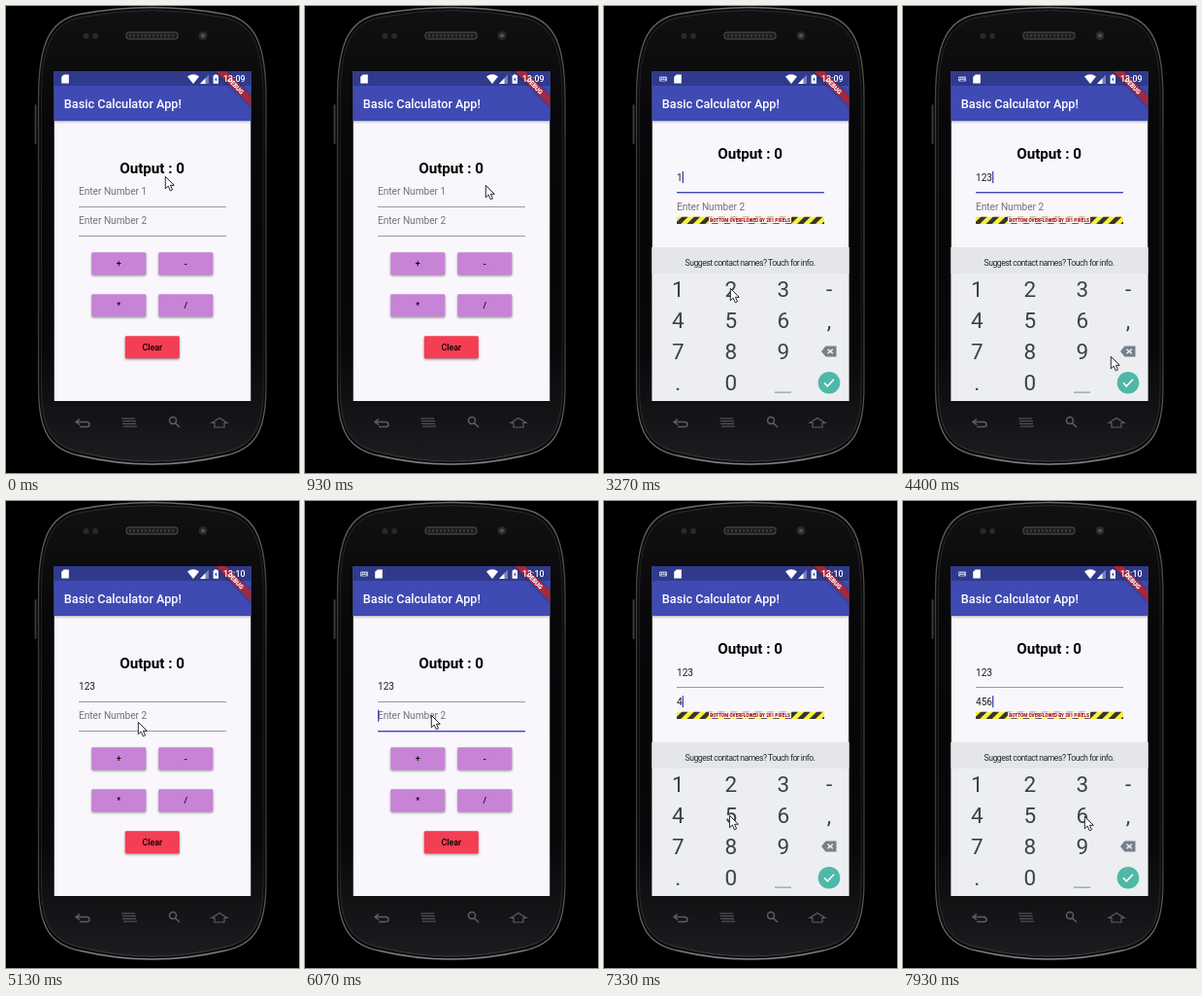
An HTML page with a canvas that plays this animation: 302 px wide and 480 px high, repeating every 8000 ms.

```html
<!DOCTYPE html>
<html lang="en">
<head>
<meta charset="utf-8">
<title>Basic Calculator App</title>
<style>
  html, body { margin: 0; width: 100%; height: 100%; overflow: hidden; background: #000; }
  canvas { display: block; }
</style>
</head>
<body>
<canvas id="stage" width="302" height="480"></canvas>
<script>
const ctx = document.getElementById('stage').getContext('2d');
const LOOP = 8000;
const SCREEN = [49.5, 67, 203, 339];
const INDIGO = '#3f4ab3', DARK_INDIGO = '#303a8c';

// Time, x, y of the mouse pointer's tip.
const POINTER = [
  [0, 164, 175], [220, 102, 257], [370, 190, 262], [520, 106, 305], [660, 152, 346],
  [930, 186, 184], [1250, 162, 191], [2250, 162, 191], [2650, 76, 288], [2850, 76, 288],
  [3200, 130, 290], [3400, 130, 290], [3800, 183, 290], [4020, 183, 290],
  [4400, 214, 360], [4560, 230, 384], [4720, 230, 384], [5130, 136, 227],
  [5200, 132, 222], [6080, 130, 220], [6600, 82, 309], [7100, 77, 321],
  [7350, 130, 323], [7520, 130, 323], [7780, 187, 324], [8000, 187, 324]
];

const FIELDS = [
  { hint: 'Enter Number 1', y: 190.5, focus: 1450, blur: 4650, keys: [[2800, '1'], [3300, '2'], [3950, '3']] },
  { hint: 'Enter Number 2', y: 220.7, focus: 5900, blur: LOOP, keys: [[7050, '4'], [7450, '5'], [7870, '6']] }
];
const KEYBOARD = [{ icon: 1540, open: 1600, close: 4680 }, { icon: 6020, open: 6130, close: LOOP + 500 }];

function text(str, x, midY, size, { color = '#000', weight = 400, align = 'left', spacing = 0 } = {}) {
  ctx.font = `${weight} ${size}px Roboto, sans-serif`;
  ctx.letterSpacing = spacing + 'px';
  ctx.textAlign = align;
  ctx.fillStyle = color;
  ctx.fillText(str, x, midY + size * 0.355);
}

function rect(x, y, w, h, color) {
  ctx.fillStyle = color;
  ctx.fillRect(x, y, w, h);
}

function rounded(x, y, w, h, radii, fill, stroke, width = 1) {
  ctx.beginPath();
  ctx.roundRect(x, y, w, h, radii);
  if (fill) { ctx.fillStyle = fill; ctx.fill(); }
  if (stroke) { ctx.strokeStyle = stroke; ctx.lineWidth = width; ctx.stroke(); }
}

function disc(x, y, r, color) {
  ctx.fillStyle = color;
  ctx.beginPath();
  ctx.arc(x, y, r, 0, Math.PI * 2);
  ctx.fill();
}

function shape(path, x, y, fill, stroke, width = 1) {
  ctx.save();
  ctx.translate(x, y);
  const p = new Path2D(path);
  if (fill) { ctx.fillStyle = fill; ctx.fill(p, 'evenodd'); }
  if (stroke) { ctx.strokeStyle = stroke; ctx.lineWidth = width; ctx.stroke(p); }
  ctx.restore();
}

function withShadow(blur, offsetY, paint) {
  ctx.save();
  ctx.shadowColor = 'rgba(0,0,0,.4)';
  ctx.shadowBlur = blur;
  ctx.shadowOffsetY = offsetY;
  paint();
  ctx.restore();
}

function vertical(...colors) {
  const g = ctx.createLinearGradient(0, 0, 0, 472);
  colors.forEach((c, i) => g.addColorStop(i / (colors.length - 1), c));
  return g;
}

// Barrel outline with bowed top and bottom, shrunk by an inset.
function body(inset) {
  const l = 33 + inset, r = 268.5 - inset, t = 8 + inset, b = 463 - inset;
  return `M${l} 95 C${l} 42 ${l + 10} ${t + 6} ${l + 42} ${t} Q150.5 ${t - 14} ${r - 42} ${t}
    C${r - 10} ${t + 6} ${r} 42 ${r} 95 V392 C${r} 438 ${r - 12} ${b - 6} ${r - 44} ${b}
    Q150.5 ${b + 17} ${l + 44} ${b} C${l + 12} ${b - 6} ${l} 438 ${l} 392 Z`;
}

function drawPhone() {
  rect(0, 0, 302, 480, '#000');
  rounded(29.5, 101, 2, 41, 1, '#383838');
  shape(body(0.5), 0, 0, '#0a0a0b',
    vertical('#6a6a6a', '#484848', '#383838', '#383838', '#383838', '#444', '#858585'), 1.3);
  shape(body(3.5), 0, 0, vertical('#111113', '#08080a', '#060607', '#08080a', '#1d1c20'),
    vertical('#2c2c2c', '#1c1c1c', '#1c1c1c', '#1c1c1c', '#3c3c3c'));
  rounded(124, 27, 53, 7, 2.5, '#1c1c1d', '#555');
  for (let x = 127; x < 175; x += 4) rect(x, 29, 2, 3, '#363638');
  disc(82.5, 31, 3, '#29292b');
  disc(92, 31, 3, '#29292b');
  disc(203, 30.5, 4.5, '#29292b');
  disc(203, 30.5, 2, '#545458');

  const grey = '#5e5e60';
  shape('M-3 -4 L-7 -1 L-3 2 M-7 -1 H4 Q7 -1 7 2 Q7 4 4 4 H-3', 79, 428.5, null, grey, 1.5);
  shape('M-8 -4 H6 M-7 -1.3 H7 M-7 1.4 H7 M-6 4.1 H8', 127, 428, null, grey);
  shape('M2.5 -1 A3.5 3.5 0 1 1 -4.5 -1 A3.5 3.5 0 1 1 2.5 -1 M1.5 1.7 L6 6', 173, 427, null, grey, 1.5);
  shape('M-8 0 L0 -5 L8 0 H5 V4.5 H-5 V0 Z', 220, 428.5, null, grey, 1.2);
}

function drawDebugBanner() {
  ctx.save();
  ctx.translate(252, 67);
  ctx.rotate(Math.PI / 4);
  withShadow(3.5, 0, () => rect(-30, 17.7, 60, 7.6, '#a4283f'));
  text('DEBUG', 0, 21.5, 6.4, { color: '#fff', weight: 900, align: 'center' });
  ctx.restore();
}

function drawStatusIcons(keyboardIcon, clock) {
  const white = '#fff';
  if (keyboardIcon) {
    rounded(57, 72.5, 8, 5, 1, '#b4b9dc');
    for (let x = 58; x < 64; x += 2) rect(x, 74, 1, 1, DARK_INDIGO);
    rect(59, 76, 4, 0.7, DARK_INDIGO);
  }
  shape('M-1.3 -4.6 H3.8 V4.6 H-3.8 V-2.2 Z', keyboardIcon ? 76 : 61, 75, white);
  shape('M0 5 L-6 -2.5 Q0 -7 6 -2.5 Z', 193, 75, white);
  shape('M-4.5 5 L4.5 -4.5 V5 Z', 204.5, 75, 'rgba(255,255,255,.35)');
  shape('M-4.5 5 L1 -.8 V5 Z', 204.5, 75, white);
  shape('M-1 -4.7 H1 V-3.8 H2.7 V4.7 H-2.7 V-3.8 H-1 Z M.4 -2 L-1.2 .7 H-.2 V2.7 L1.3 0 H.4 Z', 216.3, 75, white);
  text(clock, 224, 75, 8.9, { color: white, weight: 500 });
}

function drawField(field, t, shift) {
  const focused = t >= field.focus && t < field.blur;
  const typed = field.keys.filter(([time]) => time <= t);
  const value = typed.map(([, key]) => key).join('');
  const y = field.y + shift;
  text(value || field.hint, 75, y, 10.1, { color: value ? '#1c1c1c' : '#747276' });
  if (focused) {
    const since = t - (typed.length ? typed.at(-1)[0] : field.focus);
    const caretX = 75 + (value ? ctx.measureText(value).width : 0);
    if (Math.floor(since / 500) % 2 === 0) rect(caretX, y - 6, 1.3, 12, INDIGO);
  }
  rect(75, Math.floor(y + 15.5), 152, focused ? 1.4 : 0.8, focused ? INDIGO : '#858388');
}

function drawButton(label, x, y, color) {
  withShadow(2.5, 1.2, () => rounded(x, y, 56, 23, 1.3, color));
  text(label, x + 28, y + 12, 8.9, { weight: 500, align: 'center' });
}

function drawOverflow() {
  const top = 216.4, h = 7.6, period = 12.62;
  ctx.save();
  ctx.beginPath();
  ctx.rect(75, top, 152, h);
  ctx.clip();
  rect(75, top, 152, h, '#f8f03c');
  for (let x = 71; x < 240; x += period) {
    shape(`M-3.15 0 H3.15 l${-h} ${h} h-6.3 Z`, x, top, '#353532');
  }
  rect(108, top + 0.8, 85, 6, '#fdf9f4');
  text('BOTTOM OVERFLOWED BY 201 PIXELS', 150.5, top + 3.8, 4.65, { color: '#a80c30', weight: 800, align: 'center' });
  ctx.restore();
}

function drawKeyboard(progress) {
  const ink = '#37434c';
  ctx.save();
  ctx.globalAlpha = progress;
  ctx.translate(0, (1 - progress) * 40);
  rect(49, 248, 204, 158, '#eceef2');
  rect(49, 248, 204, 27, '#e4e6ea');
  text('Suggest contact names? Touch for info.', 150.5, 263.5, 8.7, { color: '#222a2f', align: 'center', spacing: -0.53 });
  ['123-', '456,', '789', '.0'].forEach((row, r) => {
    [...row].forEach((key, c) => {
      text(key, [76.3, 130.8, 184.8, 232][c], 291.5 + r * 32, 22.5, { color: ink, align: 'center' });
    });
  });
  rect(176, 396.6, 17, 1, '#7d888d');
  shape('M-8 0 L-3.5 -5.5 H7.5 V5.5 H-3.5 Z M-1 -2.8 L-2 -1.8 L0 0 L-2 1.8 L-1 2.8 L1.2 1 L3.4 2.8 L4.4 1.8 L2.4 0 L4.4 -1.8 L3.4 -2.8 L1.2 -1 Z',
    232, 355, '#77808a');
  disc(232, 387.3, 11.3, '#4fb8a6');
  shape('M-5 0 L-1.7 3.5 L5 -3.5', 232, 387.3, null, '#fff', 1.5);
  ctx.restore();
}

function drawPointer(t) {
  const next = Math.max(1, POINTER.findIndex(([time]) => time > t));
  const [t0, x0, y0] = POINTER[next - 1], [t1, x1, y1] = POINTER[next];
  const u = (t - t0) / (t1 - t0), e = u * u * (3 - 2 * u);
  shape('M0 0 V12.5 L2.9 9.8 L5 14.5 L7.2 13.5 L5.1 9 H9 Z',
    x0 + (x1 - x0) * e + 0.3, y0 + (y1 - y0) * e + 0.3, '#fff', '#111', 0.9);
}

function draw(t) {
  const clamp = v => Math.min(1, Math.max(0, v));
  const progress = Math.max(...KEYBOARD.map(k => clamp((t - k.open) / 120) * clamp((k.close + 120 - t) / 120)));
  const resized = KEYBOARD.some(k => t >= k.open + 30 && t < k.close);
  const icon = KEYBOARD.some(k => t >= k.icon && t < k.close);
  const shift = resized ? -14.5 : 0;

  drawPhone();
  ctx.save();
  ctx.beginPath();
  ctx.rect(...SCREEN);
  ctx.clip();
  rect(...SCREEN, '#f9f7fc');

  text('Output : 0', 150.6, 166.5 + shift, 15.2, { weight: 700, align: 'center' });
  FIELDS.forEach(f => drawField(f, t, shift));
  if (resized) {
    drawOverflow();
  } else {
    const purple = '#c783d6';
    drawButton('+', 88.3, 253.2, purple);
    drawButton('-', 157.3, 253.2, purple);
    drawButton('*', 88.3, 296.2, purple);
    drawButton('/', 157.3, 296.2, purple);
    drawButton('Clear', 122.8, 339.2, '#f43e54');
  }

  withShadow(3, 1.2, () => rect(49, 67, 204, 51, INDIGO));
  rect(49, 67, 204, 15, DARK_INDIGO);
  text('Basic Calculator App!', 59.8, 100.7, 12.65, { color: '#fff', weight: 500 });
  drawDebugBanner();
  drawStatusIcons(icon, t < 4900 ? '13:09' : '13:10');
  if (progress > 0) drawKeyboard(progress);
  ctx.restore();
  drawPointer(t);
}

const start = performance.now();
function tick() {
  draw((performance.now() - start) % LOOP);
  requestAnimationFrame(tick);
}
tick();
</script>
</body>
</html>
```
